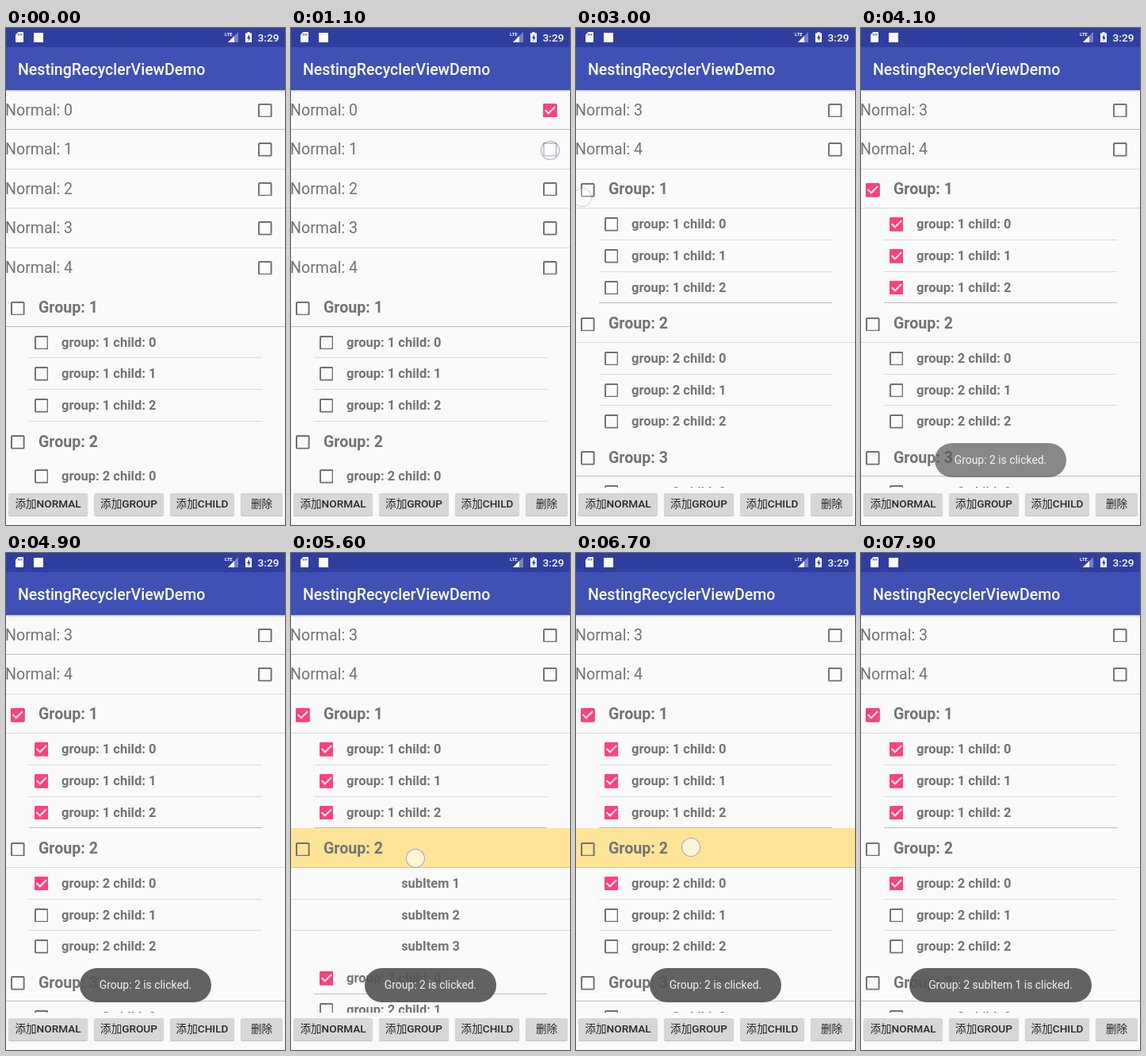
An HTML page for the animation above (8000 ms loop, 352 by 625 pixels).

```html
<!DOCTYPE html>
<html lang="zh-CN">
<head>
<meta charset="utf-8">
<title>NestingRecyclerViewDemo</title>
<style>
html, body { margin: 0; width: 100%; height: 100%; overflow: hidden; }
body { position: relative; background: #fafafa; color: #737373; font-family: Roboto, "Noto Sans CJK SC", "Noto Sans CJK", sans-serif; }
#stage { position: absolute; left: 0; top: 0; width: 352px; height: 625px; overflow: hidden; background: #fafafa; }
#stage div, #stage span, #stage svg { position: absolute; white-space: nowrap; }

/* bars */
.bar { left: 0; top: 0; width: 352px; height: 78px; background: #3f51b5; box-shadow: 0 1px 2px rgba(0,0,0,.3); }
.status { left: 0; top: 0; width: 352px; height: 24px; background: #303f9f; }
.clock { left: 317.5px; top: 3px; font: 500 13.7px/18px Roboto, sans-serif; color: #fff; }
.title { left: 15px; top: 41px; font: 500 19.5px/24px Roboto, sans-serif; color: #fff; }

/* list */
.list { left: 0; top: 78px; width: 352px; height: 500px; overflow: hidden; }
.inner { left: 0; top: -78px; width: 352px; height: 700px; }
.row { left: 0; width: 352px; }
.row span { left: 0; margin-top: .5px; }
.row svg { width: 17.6px; height: 17.6px; margin-top: .5px; }
.row.normal span { left: -1px; margin-top: .8px; font-size: 19.6px; }
.normal svg { left: 318.2px; }
.row.group span { left: 41px; margin-top: 1.3px; font-size: 19.6px; font-weight: 700; }
.row.group svg { left: 6.2px; margin-top: 2px; }
.child span { left: 70px; font-size: 16.5px; font-weight: 700; }
.child svg { left: 35.7px; }
.sub span { left: 0; width: 352px; text-align: center; font-size: 16.4px; font-weight: 700; }
.line { left: 0; width: 352px; height: 1px; background: #000; opacity: var(--a); animation-name: line; }
.child + .line { left: 29px; width: 294px; }
.panel { left: 0; top: 396px; width: 352px; height: 190px; background: #fafafa; }
.panel > .inner { top: -396px; }
.glow { left: 0; top: 346px; width: 352px; height: 50px; background: #ffe498; }

/* buttons, toasts, touch */
.btn { top: 585px; height: 28px; border-radius: 2px; background: #d6d7d7; box-shadow: 0 1px 1px rgba(0,0,0,.25); color: #262626; font-size: 13.6px; font-weight: 500; line-height: 27px; text-align: center; }
.toast { top: 522px; height: 43px; border-radius: 22px; background: rgba(85,85,85,.92); color: #f4f4f4; font-size: 13.9px; line-height: 43px; text-align: center; }
.touch { left: -12px; top: -12px; width: 22px; height: 22px; border: 1px solid rgba(110,110,165,.6); border-radius: 50%; background: rgba(255,255,255,.62); }

/* one 8 s clock, advancing in held 100 ms poses (1.25 %) */
.anim, .line { animation-duration: 8s; animation-timing-function: step-end; animation-iteration-count: infinite; }
.hidden { opacity: 0; }
.touch { animation-name: touch; }
.rest { animation-name: rise; }
.gone { animation-name: vanish; }
.glow { animation-name: glow; }
.panel { animation-name: expand; }
.press { animation-name: press; }
.t1 { left: 93px; width: 166px; animation-name: toast1; }
.t2 { left: 61px; width: 230px; animation-name: toast2; }
.tap { animation-name: tap; }
.all { animation-name: all; }
.one { animation-name: one; }

@keyframes tap { 0% { opacity: .3 } 1.25% { opacity: .7 } 2.5% { opacity: 1 } 25%, 100% { opacity: 0 } }
@keyframes all { 0% { opacity: 0 } 40% { opacity: .3 } 41.25% { opacity: .7 } 42.5%, 100% { opacity: 1 } }
@keyframes one { 0% { opacity: 0 } 58.75% { opacity: .3 } 60% { opacity: .7 } 61.25%, 100% { opacity: 1 } }
@keyframes line { 0% { opacity: var(--a) } 30%, 100% { opacity: var(--b) } }
@keyframes vanish { 0% { opacity: 1 } 25% { opacity: .6 } 26.25% { opacity: .08 } 27.5%, 100% { opacity: 0 } }
/* top rather than transform keeps the dividers on whole pixels */
@keyframes rise { 0% { top: 148.5px } 27.5% { top: 122px } 28.75% { top: 34px } 30%, 100% { top: 0 } }
@keyframes press { 0% { background: #d6d7d7 } 23.75% { background: #c2c3c3 } 27.5% { background: #cccdcd } 28.75%, 100% { background: #d6d7d7 } }
@keyframes expand { 0% { opacity: 0 } 70% { opacity: 1 } 78.75% { opacity: 0 } 88.75% { opacity: 1 } 96.25%, 100% { opacity: 0 } }
@keyframes glow {
  0% { opacity: 0 }
  47.5% { opacity: .5 } 48.75% { opacity: 1 } 50% { opacity: .5 } 51.25% { opacity: 0 }
  63.75% { opacity: .6 } 65% { opacity: 1 } 71.25% { opacity: .5 } 72.5% { opacity: 0 }
  77.5% { opacity: 1 } 78.75% { opacity: .5 } 80% { opacity: 0 }
  82.5% { opacity: .6 } 83.75% { opacity: 1 } 91.25% { opacity: .5 } 92.5%, 100% { opacity: 0 }
}
@keyframes toast1 {
  0% { opacity: 0 } 50% { opacity: .35 } 51.25% { opacity: .75 } 52.5% { opacity: .95 } 53.75% { opacity: 1 }
  75% { opacity: .8 } 76.25% { opacity: .5 } 77.5% { opacity: .2 } 78.75% { opacity: 0 }
  81.25% { opacity: .4 } 82.5% { opacity: .8 } 83.75% { opacity: 1 } 96.25%, 100% { opacity: 0 }
}
@keyframes toast2 { 0% { opacity: 0 } 96.25%, 100% { opacity: 1 } }
@keyframes touch {
  0% { opacity: 0 }
  8.75% { opacity: .6; transform: translate(327px,105px) }
  10% { opacity: 1; transform: translate(327px,105px) }
  11.25% { opacity: .4; transform: translate(327px,105px) }
  12.5%, 13.75% { opacity: 1; transform: translate(327px,154px) }
  15% { opacity: .4; transform: translate(327px,154px) }
  16.25%, 17.5% { opacity: 1; transform: translate(327px,204px) }
  18.75% { opacity: .4; transform: translate(327px,204px) }
  20% { opacity: 0; transform: none }
  23.75% { opacity: .8; transform: translate(326px,602px) }
  25% { opacity: .4; transform: translate(326px,602px) }
  26.25% { opacity: .12; transform: translate(326px,602px) }
  27.5% { opacity: 0; transform: none }
  37.5% { opacity: .5; transform: translate(8px,213px) }
  38.75% { opacity: 1; transform: translate(8px,213px) }
  40% { opacity: .4; transform: translate(8px,213px) }
  41.25% { opacity: 0; transform: none }
  47.5% { opacity: .6; transform: translate(150px,376px) }
  48.75% { opacity: 1; transform: translate(150px,376px) }
  50% { opacity: .4; transform: translate(150px,376px) }
  51.25% { opacity: 0; transform: none }
  55% { opacity: .6; transform: translate(44px,415px) }
  56.25% { opacity: 1; transform: translate(44px,415px) }
  57.5% { opacity: .4; transform: translate(44px,415px) }
  58.75% { opacity: 0; transform: none }
  63.75% { opacity: .7; transform: translate(157px,384px) }
  65% { opacity: 1; transform: translate(157px,384px) }
  71.25% { opacity: .4; transform: translate(157px,384px) }
  72.5% { opacity: 0; transform: none }
  76.25% { opacity: .5; transform: translate(145px,370px) }
  77.5% { opacity: 1; transform: translate(145px,370px) }
  78.75% { opacity: .4; transform: translate(145px,370px) }
  80% { opacity: 0; transform: none }
  82.5% { opacity: .6; transform: translate(145px,370px) }
  83.75% { opacity: 1; transform: translate(145px,370px) }
  91.25% { opacity: .4; transform: translate(145px,370px) }
  92.5% { opacity: 0; transform: none }
  95% { opacity: .8; transform: translate(145px,421px) }
  96.25% { opacity: .5; transform: translate(145px,421px) }
  97.5% { opacity: .2; transform: translate(145px,421px) }
  98.75%, 100% { opacity: 0; transform: none }
}
</style>
</head>
<body>
<div id="stage">
  <div class="list">
    <div class="inner gone anim" id="gone"></div>
    <div class="inner">
      <div class="inner rest anim" id="rest"><div class="glow anim hidden"></div></div>
      <div class="panel anim hidden"><div class="inner" id="panel"></div></div>
    </div>
  </div>

  <div class="bar">
    <div class="status">
      <svg width="352" height="24" fill="#fff">
        <path d="M15.5 5H21q1 0 1 1V17q0 1-1 1H13q-1 0-1-1V8.5z"/>
        <path d="M15.5 7v2.5M17.7 7v2.5M19.9 7v2.5" stroke="#303f9f"/>
        <rect x="35" y="6" width="12" height="12"/>
        <text x="276" y="10" font-size="6" font-weight="700">LTE</text>
        <path d="M293 5V18H280z" opacity=".35"/>
        <path d="M288 10V18H280z"/>
        <path d="M304.500 5h3v1.400h2.500V18h-8V6.400h2.500z"/>
        <path d="M307 8l-3 5h1.800v3.500l3-5H307z" fill="#303f9f"/>
      </svg>
      <span class="clock">3:29</span>
    </div>
    <span class="title">NestingRecyclerViewDemo</span>
  </div>

  <div class="btn" style="left:3px;width:100px">添加NORMAL</div>
  <div class="btn" style="left:111px;width:88px">添加GROUP</div>
  <div class="btn" style="left:207px;width:81px">添加CHILD</div>
  <div class="btn press anim" style="left:296px;width:53px">删除</div>

  <div class="toast t1 anim hidden">Group: 2 is clicked.</div>
  <div class="toast t2 anim hidden">Group: 2 subItem 1 is clicked.</div>
  <div class="touch anim hidden"></div>
</div>

<script>
const TOP = 78.2, TALL = 49.5, SHORT = 39.7;
const NONE = 0, THIN = .13, BOLD = .24;

function box(top, mark, delay) {
  const on = mark ? `<g class="${mark}" style="animation-delay:${delay}s">
    <rect x="3" y="3" width="18" height="18" rx="2" fill="#ff4081"/>
    <path d="M10 17l-5-5 1.410-1.410L10 14.170l7.590-7.590L19 8z" fill="#fff"/></g>` : '';
  return `<svg style="top:${top}px" viewBox="3 3 18 18">
    <rect x="4" y="4" width="16" height="16" rx="1" fill="none" stroke="#707070" stroke-width="2"/>${on}</svg>`;
}

// Each row: [kind, text, divider before the move, divider after, check animation, delay]
function fill(id, y, rows) {
  let html = '';
  for (const [kind, text, a, b, mark, delay = 0] of rows) {
    const h = kind === 'normal' || kind === 'group' ? TALL : SHORT;
    const icon = kind === 'sub' ? '' : box(h / 2 - 8.8, mark, delay);
    html += `<div class="row ${kind}" style="top:${y}px;height:${h}px;line-height:${h}px">
      <span>${text}</span>${icon}</div>`;
    y += h;
    html += `<div class="line" style="top:${y - .5}px;--a:${a};--b:${b}"></div>`;
  }
  document.getElementById(id).insertAdjacentHTML('beforeend', html);
}

const child = (g, i) => `group: ${g} child: ${i}`;

fill('gone', TOP, [
  ['normal', 'Normal: 0', BOLD, BOLD, 'anim hidden tap', .9],
  ['normal', 'Normal: 1', THIN, THIN, 'anim hidden tap', 1.2],
  ['normal', 'Normal: 2', THIN, THIN, 'anim hidden tap', 1.5]
]);

fill('rest', TOP, [
  ['normal', 'Normal: 3', THIN, BOLD],
  ['normal', 'Normal: 4', NONE, THIN],
  ['group', 'Group: 1', BOLD, THIN, 'anim all'],
  ['child', child(1, 0), THIN, THIN, 'anim all'],
  ['child', child(1, 1), THIN, THIN, 'anim all'],
  ['child', child(1, 2), THIN, BOLD, 'anim all'],
  ['group', 'Group: 2', NONE, THIN],
  ['child', child(2, 0), THIN, THIN, 'anim one'],
  ['child', child(2, 1), THIN, THIN],
  ['child', child(2, 2), THIN, NONE],
  ['group', 'Group: 3', THIN, BOLD],
  ['child', child(3, 0), THIN, THIN]
]);

fill('panel', TOP + 4 * TALL + 3 * SHORT, [
  ['sub', 'subItem 1', THIN, THIN],
  ['sub', 'subItem 2', THIN, THIN],
  ['sub', 'subItem 3', NONE, NONE],
  ['child', child(2, 0), BOLD, BOLD, 'checked'],
  ['child', child(2, 1), THIN, THIN]
]);
</script>
</body>
</html>
```
